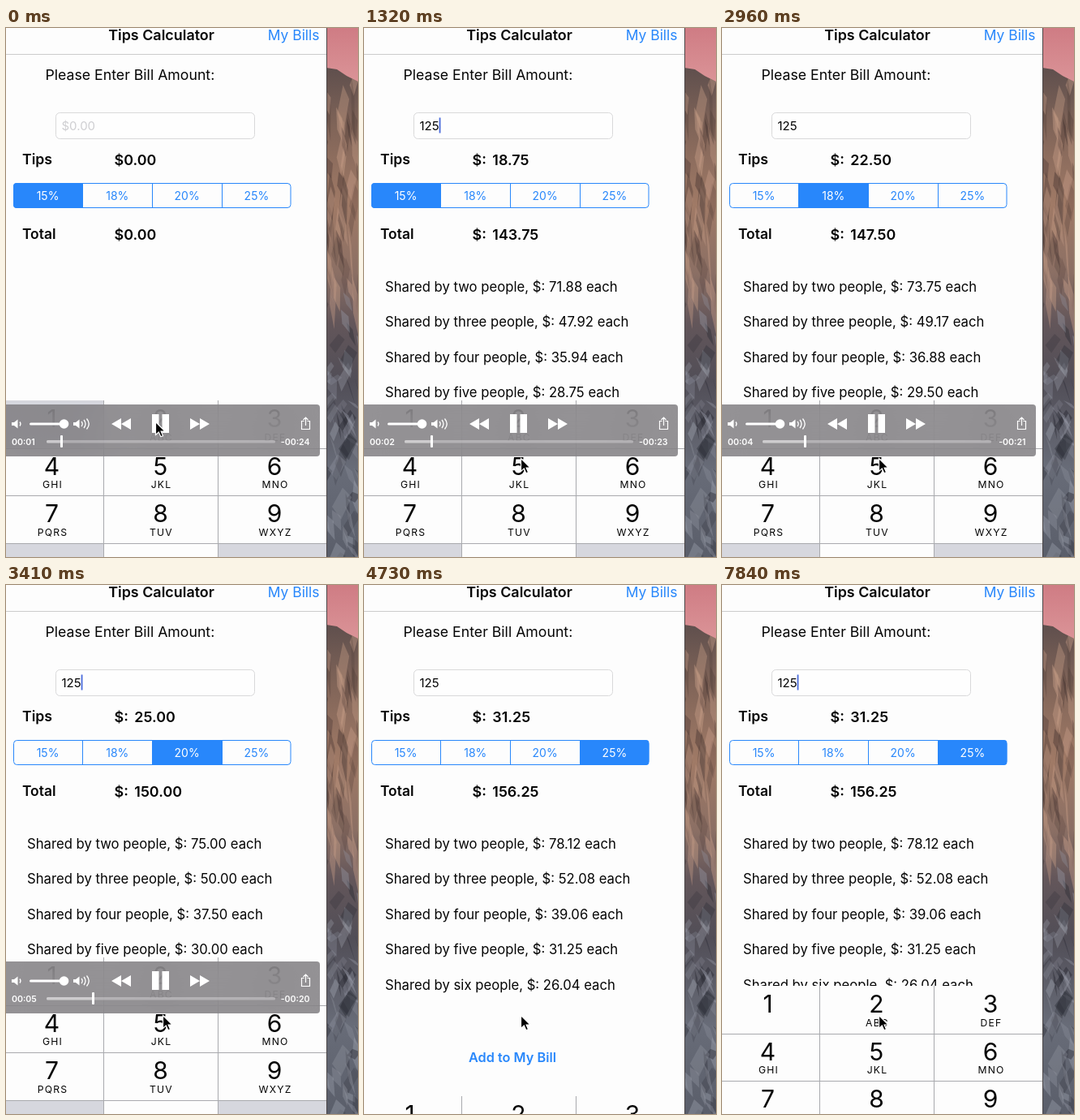
Recreate the animation shown at these times as an HTML page. Size 434 px wide and 652 px high, loop 7.99 s.

```html
<!DOCTYPE html>
<html lang="en">
<head>
<meta charset="utf-8">
<title>Tips Calculator</title>
<style>
  html, body { margin: 0; width: 100%; height: 100%; overflow: hidden; background: #fdfdfd; }
  #stage { position: relative; width: 434px; height: 652px; overflow: hidden; }
  svg { position: absolute; left: 0; top: 0; display: block; }
  text { font-family: Inter, Roboto, sans-serif; white-space: pre; }
  #bar {
    position: absolute; left: 0; top: 464px; width: 387px; height: 64px; overflow: hidden;
    border-radius: 0 4px 4px 0; background: rgba(122, 119, 123, .8);
    -webkit-backdrop-filter: blur(26px); backdrop-filter: blur(26px);
  }
</style>
</head>
<body>
<div id="stage">
  <svg id="app" width="434" height="652">
    <defs>
      <linearGradient id="rock" x1="0" y1="0" x2="0" y2="1">
        <stop offset="0" stop-color="#5f4f4d"/>
        <stop offset=".12" stop-color="#806458"/>
        <stop offset=".28" stop-color="#a07a66"/>
        <stop offset=".42" stop-color="#8b6f64"/>
        <stop offset=".52" stop-color="#63565a"/>
        <stop offset=".64" stop-color="#514e57"/>
        <stop offset=".82" stop-color="#686c78"/>
        <stop offset="1" stop-color="#5a5e6a"/>
      </linearGradient>
      <linearGradient id="sky" x1="0" y1="0" x2="0" y2="1">
        <stop offset="0" stop-color="#cf7c84"/>
        <stop offset="1" stop-color="#dc979a"/>
      </linearGradient>
      <clipPath id="segClip"><rect x="9" y="191" width="342.5" height="31" rx="4"/></clipPath>
      <clipPath id="cliff"><path d="M395 49L408 51L420 59L434 66V652H395Z"/></clipPath>
    </defs>
    <rect x="395" width="39" height="76" fill="url(#sky)"/>
    <g id="wall" clip-path="url(#cliff)">
      <rect x="395" y="49" width="39" height="603" fill="url(#rock)"/>
    </g>
    <rect width="395" height="652" fill="#fdfdfd"/>
    <path d="M395.5 0V652" stroke="#4a4546"/>
    <path d="M0 32.5H395" stroke="#cbcbcc"/>
    <g id="page"></g>
    <g id="pad"></g>
  </svg>
  <div id="bar">
    <svg id="ctl" width="387" height="64" fill="#fff">
      <path id="low" d="M7 22H10L14.500 18.500V29.500L10 26H7Z"/>
      <path d="M17 21.500Q19 24 17 26.500" fill="none" stroke="#fff" stroke-width="1.300"/>
      <rect x="29" y="22.500" width="43" height="3" rx="1.500"/>
      <circle cx="71.500" cy="24" r="5.800"/>
      <use href="#low" x="76"/>
      <path d="M93 21Q95.500 24 93 27M96 19Q100 24 96 29M99.500 17.500Q105 24 99.500 30.500" fill="none" stroke="#fff" stroke-width="1.300"/>
      <path d="M142 17V31L130 24ZM154 17V31L142 24Z"/>
      <path d="M180 12H188.500V35H180ZM192.500 12H201V35H192.500Z"/>
      <path d="M227 17V31L239 24ZM239 17V31L251 24Z"/>
      <path d="M367.500 20.500H364.500V30.500H374.500V20.500H371.500M369.500 26V16.500M366.500 19L369.500 16L372.500 19" fill="none" stroke="#fff" stroke-width="1.200"/>
      <rect x="50" y="44" width="282" height="3.500" rx="1.500" opacity=".3"/>
    </svg>
  </div>
  <svg id="mouse" width="20" height="26">
    <path d="M1.500 1.500V17.500L5.300 14L7.900 19.700L10.500 18.600L8.100 13H13Z" fill="#000" stroke="#fff" stroke-width="1.200"/>
  </svg>
</div>
<script>
const LOOP = 7990, TICK = 148;
const BLUE = '#2887fb', INK = '#050505';
const $ = id => document.getElementById(id);
const clamp = v => Math.min(1, Math.max(0, v));
const ramp = (t, from, dur) => clamp((t - from) / dur);
const easeOut = p => 1 - (1 - p) ** 4.1;

function add(parent, tag, attrs) {
  const el = document.createElementNS('http://www.w3.org/2000/svg', tag);
  for (const k in attrs) el.setAttribute(k, attrs[k]);
  return parent.appendChild(el);
}
// y is the middle of the capitals, the baseline sits on a whole pixel
function label(parent, x, y, size, str, attrs = {}) {
  const el = add(parent, 'text', { x, y: Math.round(y + size * .364), 'font-size': size, fill: INK, ...attrs });
  el.textContent = str;
  return el;
}
const set = (el, str) => { if (el.textContent !== str) el.textContent = str; };

// cliff: seeded shards, steep and warm above, broken and cool below
let seed = 7;
const rnd = () => (seed = seed * 16807 % 2147483647) / 2147483647;
for (let i = 0; i < 110; i++) {
  const x = 392 + rnd() * 42, y = 50 + rnd() * 600, low = y > 320;
  const h = low ? 12 + rnd() * 30 : 25 + rnd() * 60, w = 3 + rnd() * (low ? 9 : 5);
  const lean = (rnd() - .6) * (low ? 24 : 12);
  const tone = rnd() < .5 ? (low ? '#25262f' : '#40302e') : (low ? '#9a9eaa' : '#c99f89');
  add($('wall'), 'path', {
    d: `M${x} ${y}l${w} ${h * .3}l${lean} ${h * .7}l${-w} ${-h * .4}Z`, fill: tone, opacity: .2 + rnd() * .25
  });
}

// page
const page = $('page'), MID = { 'text-anchor': 'middle' }, BOLD = { 'font-weight': 600 };
label(page, 191.5, 8, 17.9, 'Tips Calculator', { ...MID, ...BOLD });
label(page, 322.8, 8.5, 17.4, 'My Bills', { fill: BLUE });
label(page, 48.5, 58, 17.7, 'Please Enter Bill Amount:');
add(page, 'rect', { x: 61.5, y: 104.5, width: 245, height: 32, rx: 5, fill: '#fefefe', stroke: '#d9d9da' });
const field = label(page, 68.5, 120.5, 15, '');
const caret = add(page, 'rect', { y: 110.5, width: 1.8, height: 19, fill: '#4a6cdc' });
label(page, 20, 162, 17.7, 'Tips', BOLD);
label(page, 20, 254, 17.4, 'Total', BOLD);
const AMOUNT = { ...BOLD, 'word-spacing': 3 };
const tipText = label(page, 133.5, 162, 17.9, '', AMOUNT);
const totalText = label(page, 133.5, 254, 17.9, '', AMOUNT);

const rates = [15, 18, 20, 25];
const fills = rates.map((r, i) => add(page, 'rect', {
  x: 9 + i * 85.7, y: 191, width: 85.7, height: 31, fill: BLUE, 'clip-path': 'url(#segClip)'
}));
add(page, 'rect', { x: 9.5, y: 191.5, width: 341.5, height: 30, rx: 4, fill: 'none', stroke: BLUE });
add(page, 'path', { d: 'M94.5 191V222M180.5 191V222M266.5 191V222', stroke: BLUE });
const segText = rates.map((r, i) => label(page, 51.5 + i * 85.8, 206.5, 14, r + '%', MID));

const shares = ['two', 'three', 'four', 'five', 'six'].map((name, i) => ({
  name, count: i + 2, el: label(page, 26, 318.7 + i * 43.5, 16.7, '')
}));
const addButton = label(page, 183, 582, 16.3, 'Add to My Bill', { ...MID, ...BOLD, fill: BLUE });

// keypad
const pad = $('pad'), keys = [], colX = [0, 120.5, 261.5, 395], colMid = [56.5, 190.5, 331];
const letters = ['', 'ABC', 'DEF', 'GHI', 'JKL', 'MNO', 'PQRS', 'TUV', 'WXYZ'];
for (let n = 0; n < 12; n++) {
  const r = Math.floor(n / 3), c = n % 3;
  keys.push(add(pad, 'rect', {
    x: colX[c], y: 459 + r * 58.6, width: colX[c + 1] - colX[c], height: 59,
    fill: n === 9 || n === 11 ? '#d6d7de' : '#fdfdfd'
  }));
  if (n > 8) continue;
  label(pad, colMid[c], 481.5 + r * 58.5, 30, n + 1, MID);
  label(pad, colMid[c] + 1, 504.5 + r * 58.5, 12.2, letters[n], { ...MID, 'letter-spacing': 1.2 });
}
add(pad, 'path', {
  d: 'M120.5 459V700M261.5 459V700M0 518.5H395M0 576.5H395M0 635.5H395', stroke: '#a9aaae', fill: 'none'
});

// player
const ctl = $('ctl');
const played = add(ctl, 'rect', { x: 50, y: 44, height: 3.5, rx: 1.5, opacity: .35 });
const thumb = add(ctl, 'rect', { y: 38, width: 3, height: 15, rx: 1 });
const WHITE = { fill: '#fff', 'font-weight': 600 };
const elapsed = label(ctl, 7, 46, 10.6, '', WHITE);
const remain = label(ctl, 374.5, 46, 10.6, '', { ...WHITE, 'text-anchor': 'end' });

// half-even rounding to cents
function money(v) {
  const c = +(v * 100).toFixed(6);
  let r = Math.round(c);
  if (c % 1 === .5 && r % 2) r--;
  return (r / 100).toFixed(2);
}
const clock = s => '00:' + String(s).padStart(2, '0');

const typing = [[148, '1'], [592, '12'], [1036, '125']];
const presses = [[0, 148, 0], [444, 592, 1], [888, 1036, 4]];
const picks = [[-999, 0], [2150, 1], [3020, 2], [3950, 3]];
const latest = (table, t) => table.filter(row => row[0] <= t).pop();

function draw(t) {
  const entry = (latest(typing, t) || [0, ''])[1];
  const [since, pick] = latest(picks, t);
  const tip = entry * rates[pick] / 100, total = +entry + tip;

  set(field, entry || '$0.00');
  field.setAttribute('fill', entry ? INK : '#cfcfd2');
  set(tipText, entry ? '$: ' + money(tip) : '$0.00');
  set(totalText, entry ? '$: ' + money(total) : '$0.00');
  for (const s of shares)
    set(s.el, entry ? `Shared by ${s.name} people, $: ${money(total / s.count)} each` : '');

  const editing = t >= 148 && t < 4600 || t >= 7690;
  const lit = t < 1800 || t >= 7690 || t >= 2300 && (t - 2300) % 1000 < 500;
  caret.setAttribute('opacity', editing && lit ? 1 : 0);
  caret.setAttribute('x', 68.5 + field.getComputedTextLength());

  const p = ramp(t, since, 250);
  rates.forEach((r, i) => {
    const on = i === pick ? p : i === pick - 1 ? 1 - p * p : 0;
    fills[i].setAttribute('opacity', on);
    const mix = [40, 135, 251].map(v => Math.round(v + (255 - v) * on));
    segText[i].setAttribute('fill', `rgb(${mix})`);
  });

  const dim = t >= 5900 ? 1 - ramp(t, 6100, 340) : 0;
  addButton.setAttribute('opacity', 1 - .75 * dim);

  for (const [from, to, k] of presses)
    keys[k].setAttribute('fill', t >= from && t < to ? '#d6d7de' : '#fdfdfd');
  const hidden = t < 7690 ? easeOut(ramp(t, 4600, 430)) : 1 - easeOut(ramp(t, 7690, 430));
  pad.setAttribute('transform', `translate(0 ${Math.round(216 * hidden)})`);

  const x = 68.2 + t * .01142, sec = Math.floor((x - 50) / 11.28);
  played.setAttribute('width', x - 50);
  thumb.setAttribute('x', Math.round(x - 1.5));
  set(elapsed, clock(sec));
  set(remain, '-' + clock(25 - sec));
  const fade = 1 - ramp(t, 4150, 430);
  $('bar').style.opacity = fade;
  $('bar').style.visibility = fade ? 'visible' : 'hidden';

  const m = easeOut(ramp(t, 140, 700));
  $('mouse').style.transform = `translate(${183 + 9 * m}px, ${484 + 45 * m}px)`;
}

const start = performance.now();
function frame() {
  const t = (performance.now() - start) % LOOP;
  draw(Math.min(53, Math.floor((t + 14) / TICK)) * TICK);
  requestAnimationFrame(frame);
}
frame();
</script>
</body>
</html>
```
